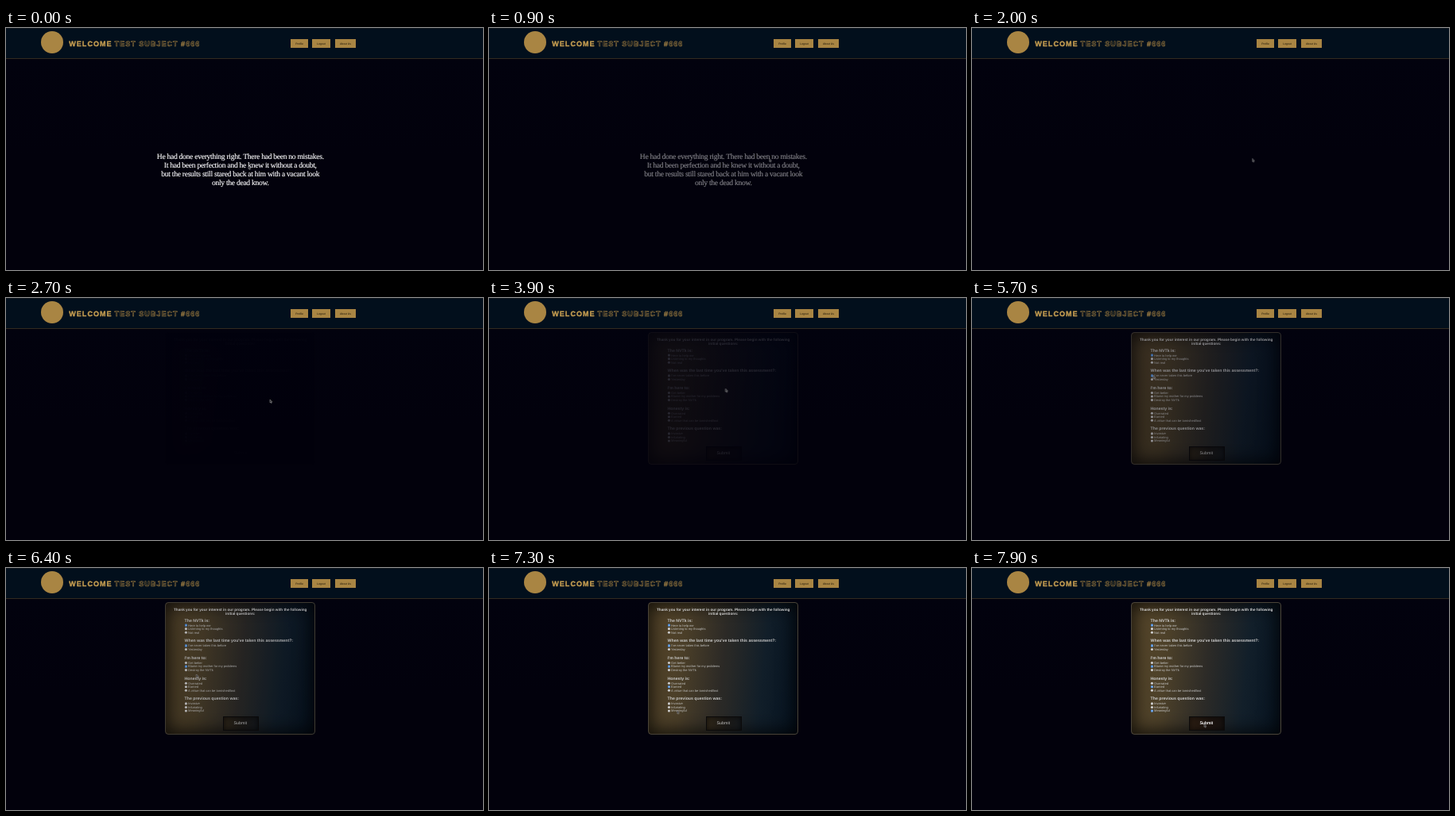
An HTML page for the animation above (8000 ms loop, 600 px wide and 305 px high).

```html
<!DOCTYPE html>
<html lang="en">
<head>
<meta charset="utf-8">
<title>Questionnaire</title>
<style>
  html, body { margin: 0; width: 100%; height: 100%; overflow: hidden; background: #02010c; }
  #stage { position: relative; width: 600px; height: 305px; overflow: hidden;
    background: linear-gradient(#02020e 38px, #02010c 160px, #02010c); }
  #stage > *, #form > * { position: absolute; box-sizing: border-box; }
  svg { left: 0; top: 0; width: 600px; height: 305px; overflow: visible; }
  text { font-family: "Liberation Sans", Arial, sans-serif; text-rendering: geometricPrecision; }
  header { left: 0; top: 0; width: 600px; height: 39px; background: #020f1c;
    border-top: 1px solid #11181f; border-bottom: 1px solid #322b20; }
  .title { font-size: 9px; font-weight: bold; letter-spacing: 1.04px; }
  .filled { fill: #c29b50; stroke: #c29b50; stroke-width: .4px; }
  .hollow { fill: #050c14; stroke: #a98648; stroke-width: .5px; }
  .nav { font-size: 3.4px; fill: #120d04; text-anchor: middle; }
  .story { font-family: "Liberation Serif", "Times New Roman", serif; font-size: 9.6px;
    letter-spacing: -.29px; fill: #fff; stroke: #fff; stroke-width: .14px; text-anchor: middle; }
  #form { left: 0; top: 0; width: 600px; height: 305px; opacity: 0; }
  #panel { left: 200px; top: 43px; width: 189px; height: 167px; border-radius: 4px;
    border: 1px solid #4b4539;
    background: linear-gradient(96deg, #5b4a2c 0%, #4c4029 25%, #2d2b27 50%, #121f2a 75%, #061321 100%);
    box-shadow: inset 0 0 22px 3px rgba(0, 0, 0, .8); }
  .button { left: 273px; top: 186.5px; width: 44.5px; height: 18.5px; border: 1px solid #0c0b0b;
    background: linear-gradient(100deg, #302719, #1d1b18 55%, #15191d);
    box-shadow: inset 0 0 6px rgba(0, 0, 0, .6); }
  #hover { background: linear-gradient(100deg, #2b1d12, #1c130e 55%, #15110f); opacity: 0; }
  .intro { font-size: 4.7px; font-weight: bold; fill: #d8d8d8; text-anchor: middle; }
  .question { font-size: 5.2px; font-weight: bold; fill: #d0d0d0; }
  .answer { font-size: 4px; fill: #c4c4c4; }
  .submit { font-size: 5.3px; fill: #c8c8c8; text-anchor: middle; }
</style>
</head>
<body>
<div id="stage">
  <header></header>
  <svg id="top">
    <circle cx="58" cy="18" r="14" fill="#a98543"/>
    <text class="title filled" x="79.3" y="22.5">WELCOME</text>
    <text class="title hollow" x="136.6" y="22.5">TEST SUBJECT #666</text>
  </svg>
  <svg id="story"></svg>
  <div id="form">
    <div id="panel"></div>
    <div class="button"></div>
    <div class="button" id="hover"></div>
    <svg id="questions"></svg>
  </div>
  <svg>
    <path id="cursor" d="M0 0V3.8L.9 3L1.6 4.5L2.2 4.2L1.6 2.8H2.8Z"
      fill="#15151a" stroke="#c8c8c8" stroke-width=".45"/>
  </svg>
</div>
<script>
const LOOP = 8000;
const $ = id => document.getElementById(id);

function add(parent, tag, attrs, content) {
  const el = document.createElementNS("http://www.w3.org/2000/svg", tag);
  for (const key in attrs) el.setAttribute(key, attrs[key]);
  if (content) el.textContent = content;
  parent.append(el);
  return el;
}
const label = (parent, cls, x, y, content) => add(parent, "text", { class: cls, x, y }, content);

// steps: [time, value, easing towards the next step]
function play(el, prop, steps) {
  const frames = steps.map(([time, value, easing = "linear"]) =>
    ({ offset: time / LOOP, [prop]: value, easing }));
  el.animate(frames, { duration: LOOP, iterations: Infinity }).startTime = 0;
}
const showAt = (el, time) =>
  play(el, "opacity", [[0, 0], [time, 0], [time, 1], [LOOP, 1]]);

// Navigation
[["Profile", 358, 22], ["Logout", 385, 23], ["About Us", 414, 26]].forEach(([name, x, width]) => {
  add($("top"), "rect", { x, y: 14, width, height: 11, fill: "#a98543" });
  label($("top"), "nav", x + width / 2, 20.6, name);
});

// Opening passage
[
  "He had done everything right. There had been no mistakes.",
  "It had been perfection and he knew it without a doubt,",
  "but the results still stared back at him with a vacant look",
  "only the dead know."
].forEach((line, i) => label($("story"), "story", 294.8, 164.8 + i * 10.9, line));

// Questionnaire: heading, centre line, answers, chosen answer, time of choice
const questions = [
  ["The NVTk is:", 65.6, ["Here to help me", "Listening to my thoughts", "Not real"], 0, 4500],
  ["When was the last time you've taken this assessment?:", 91.4,
    ["I've never taken this before", "Yesterday"], 0, 5400],
  ["I'm here to:", 113, ["Get better", "Blame my mother for my problems", "Destroy the NVTk"], 1, 6100],
  ["Honesty is:", 138.7, ["Overrated", "Earned", "A virtue that can be tarnished/lost"], 1, 6900],
  ["The previous question was:", 164.4, ["Invasive", "Infuriating", "Meaningful"], 2, 7400]
];
const sheet = $("questions");
label(sheet, "intro", 294.7, 54, "Thank you for your interest in our program. Please begin with the following");
label(sheet, "intro", 294.7, 59.4, "initial questions:");
for (const [heading, mid, answers, chosen, time] of questions) {
  label(sheet, "question", 224.6, mid + 1.9, heading);
  answers.forEach((answer, i) => {
    const cy = mid + 6.5 + i * 4.55;
    add(sheet, "circle", { cx: 226.4, cy, r: 1.55, fill: "#d2d2d2" });
    label(sheet, "answer", 229.1, cy + 1.4, answer);
    if (i === chosen) {
      const mark = add(sheet, "g", {});
      add(mark, "circle", { cx: 226.4, cy, r: 1.6, fill: "#2f7fe0" });
      add(mark, "circle", { cx: 226.4, cy, r: .65, fill: "#dfe9f5" });
      showAt(mark, time);
    }
  });
}
label(sheet, "submit", 294.8, 196.8, "Submit");
const lit = label(sheet, "submit", 294.8, 196.8, "Submit");
lit.style.fill = "#f2f2f2";

play($("story"), "opacity", [[0, 1], [250, 1, "ease-in-out"], [1550, 0], [LOOP, 0]]);
play($("form"), "opacity", [[0, 0], [2200, 0, "ease-in-out"], [7900, 1], [LOOP, 1]]);
showAt($("hover"), 7800);
showAt(lit, 7800);

const glide = "ease-in-out";
play($("cursor"), "transform", [
  [0, 305, 174], [300, 305, 174, glide], [900, 352.5, 164.5],
  [2200, 352.5, 164.5, glide], [2700, 332, 128], [3150, 326.5, 132],
  [3600, 326.5, 132, glide], [4400, 228, 72],
  [4800, 228, 72, glide], [5200, 234, 98], [5400, 228, 97.5],
  [5700, 228, 97.5, glide], [6050, 229, 123],
  [6200, 229, 123], [6400, 239.5, 134, glide], [6800, 229, 149],
  [6950, 229, 149, glide], [7300, 236.5, 179.5],
  [7500, 236.5, 179.5, glide], [7850, 292, 196.5], [LOOP, 292, 196.5]
].map(([time, x, y, easing]) => [time, `translate(${x}px, ${y}px)`, easing]));
</script>
</body>
</html>
```
